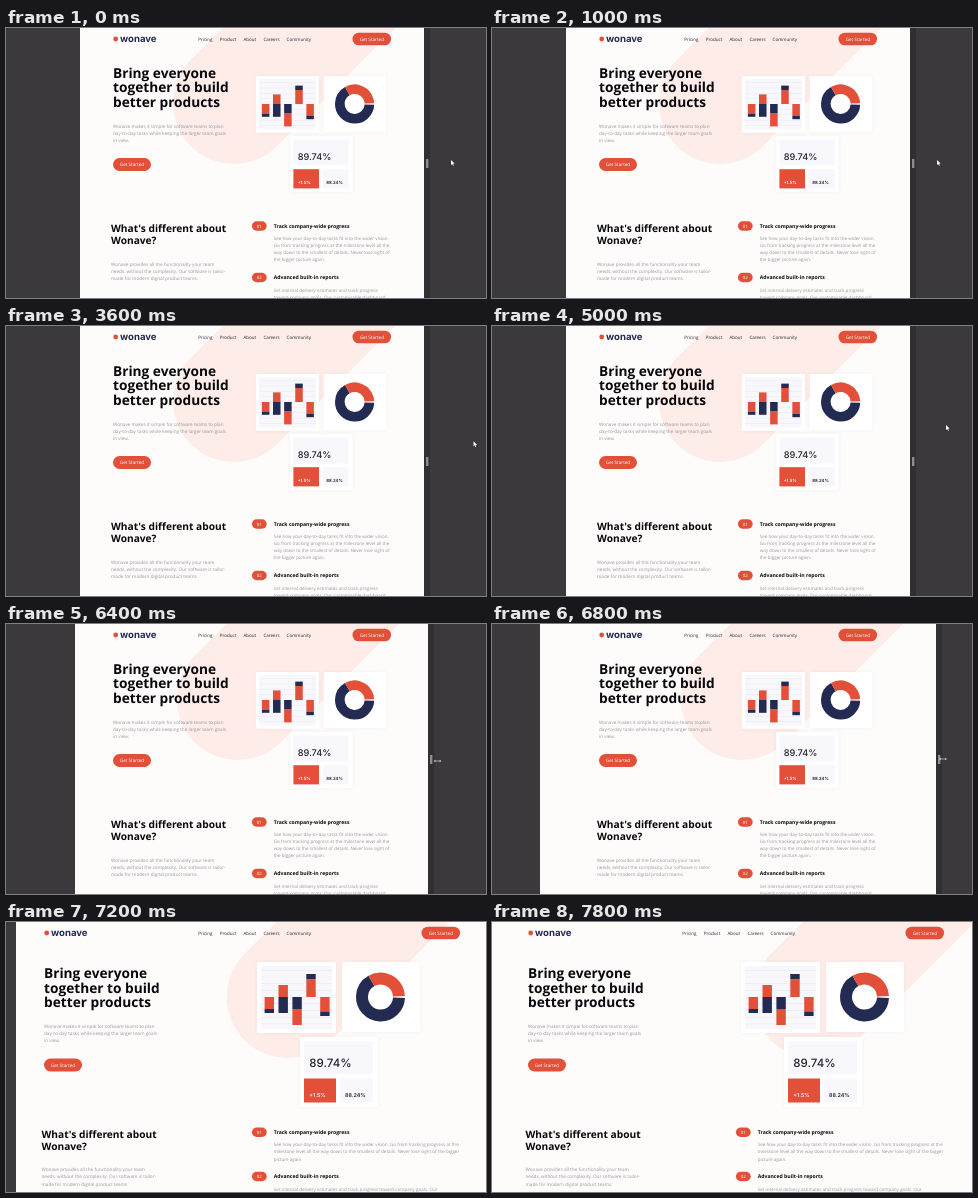
Animation of 480x270 px, one loop 8000 ms. Source, as an HTML page with a canvas:

```html
<!DOCTYPE html>
<html lang="en">
<head>
<meta charset="utf-8">
<title>Responsive landing page</title>
<style>
  html, body { margin: 0; width: 100%; height: 100%; overflow: hidden; background: #3b393c; }
  canvas { display: block; width: 480px; height: 270px; }
</style>
</head>
<body>
<canvas id="stage"></canvas>
<script>
const LOOP = 8000, STEP = 200;
const RED = '#e3503a', NAVY = '#242b52', INK = '#08080c', GREY = '#96969e', PANEL = '#f8f8fc';
const SANS = '"Open Sans", "Noto Sans", sans-serif';
const canvas = document.getElementById('stage');
const ctx = canvas.getContext('2d');
const ratio = window.devicePixelRatio || 1;
canvas.width = 480 * ratio;
canvas.height = 270 * ratio;

const layouts = {
  narrow: {
    left: 107, right: 385, logoY: 11, heroY: 49.5, introY: 99.6, ctaY: 136.5,
    titleX: 105, titleY: 203.8, aboutY: 237.5,
    art: [0.8, 49, 16],
    features: [
      [198, 'Track company-wide progress', 212, [
        'See how your day-to-day tasks fit into the wider vision.',
        'Go from tracking progress at the milestone level all the',
        'way down to the smallest of details. Never lose sight of',
        'the bigger picture again.']],
      [249.5, 'Advanced built-in reports', 263.5, [
        'Set internal delivery estimates and track progress',
        'toward company goals. Our customisable dashboard']]
    ]
  },
  wide: {
    left: 38, right: 454, logoY: 11, heroY: 56, introY: 105.8, ctaY: 143,
    titleX: 35.5, titleY: 215.8, aboutY: 249.2,
    art: [1, 0, 0],
    features: [
      [210.2, 'Track company-wide progress', 224.3, [
        'See how your day-to-day tasks fit into the wider vision. Go from tracking progress at the',
        'milestone level all the way down to the smallest of details. Never lose sight of the bigger',
        'picture again.']],
      [254.5, 'Advanced built-in reports', 268.5, [
        'Set internal delivery estimates and track progress toward company goals. Our']]
    ]
  }
};

// Linear interpolation over [time, value] pairs
function track(t, keys) {
  if (t <= keys[0][0]) return keys[0][1];
  for (let i = 1; i < keys.length; i++) {
    const [t0, a] = keys[i - 1], [t1, b] = keys[i];
    if (t <= t1) return a + (b - a) * (t - t0) / (t1 - t0);
  }
  return keys[keys.length - 1][1];
}

function rect(x, y, w, h, color) {
  ctx.fillStyle = color;
  ctx.fillRect(x, y, w, h);
}

function text(str, x, y, size, color, weight = 400, align = 'left', family = SANS) {
  ctx.font = `${weight} ${size}px ${family}`;
  ctx.textAlign = align;
  ctx.fillStyle = color;
  ctx.fillText(str, x, y);
}

function lines(list, x, y, pitch, ...style) {
  list.forEach((str, i) => text(str, x, y + i * pitch, ...style));
}

function pill(cx, cy, w, h, label, size) {
  ctx.fillStyle = RED;
  ctx.beginPath();
  ctx.roundRect(cx - w / 2, cy - h / 2, w, h, h / 2);
  ctx.fill();
  text(label, cx, cy + size * 0.36, size, '#fff', 400, 'center');
}

function card(x, y, w, h) {
  ctx.save();
  ctx.shadowColor = 'rgba(60, 50, 80, 0.05)';
  ctx.shadowBlur = 4 * ratio;
  rect(x, y, w, h, '#fff');
  ctx.restore();
}

function drawBlob(x) {
  const y = 75, r = 61;
  ctx.strokeStyle = '#fdece8';
  ctx.lineWidth = 2 * r;
  ctx.lineCap = 'round';
  ctx.beginPath();
  ctx.moveTo(x, y);
  ctx.lineTo(x + 300, y - 300);
  ctx.stroke();
}

function arc(from, to, color) {
  ctx.strokeStyle = color;
  ctx.lineWidth = 12;
  ctx.lineCap = 'butt';
  ctx.beginPath();
  ctx.arc(374.5, 75, 18.5, from, to);
  ctx.stroke();
}

function drawCharts([scale, dx, dy]) {
  ctx.save();
  ctx.translate(dx, dy);
  ctx.scale(scale, scale);

  card(251, 40, 79, 71);
  rect(255, 44, 71, 63, PANEL);
  for (let y = 48; y < 107; y += 6.7) rect(255, y, 71, 0.6, '#e6e7f0');
  const bars = [
    [75, 87, 91, RED, NAVY], [63, 75, 91, RED, NAVY], [75, 87, 103, NAVY, RED],
    [52, 57.5, 75, NAVY, RED], [75, 89.5, 94, RED, NAVY]
  ];
  bars.forEach(([top, split, bottom, upper, lower], i) => {
    const x = 258.6 + i * 13.9;
    rect(x, top, 9.4, split - top, upper);
    rect(x, split, 9.4, bottom - split, lower);
  });

  card(336, 40, 78, 70);
  arc(0.04, 4.2, NAVY);
  arc(4.2, 6.24, RED);

  card(294, 115, 78, 70);
  rect(298, 119.5, 69, 32.5, PANEL);
  rect(298, 156.5, 32, 24, RED);
  rect(334, 156.5, 33, 24, PANEL);
  const inter = 'Inter, sans-serif';
  text('89.74%', 303.3, 145, 11.5, '#20222e', 500, 'left', inter);
  text('+1.5%', 303.3, 175, 5.4, '#fff', 600, 'left', inter);
  text('88.24%', 339, 175, 5.4, '#20222e', 600, 'left', inter);
  ctx.restore();
}

function drawPage(page) {
  const x = page.left;
  ctx.fillStyle = RED;
  ctx.beginPath();
  ctx.arc(x + 2.7, page.logoY, 2.4, 0, 2 * Math.PI);
  ctx.fill();
  text('wonave', x + 7, 14, 9.6, NAVY, 700, 'left', 'Inter, sans-serif');

  const nav = { Pricing: 192.3, Product: 213.8, About: 237.5, Careers: 257.5, Community: 280.6 };
  for (const label in nav) text(label, nav[label], 12.9, 4.5, '#26262e', 500);
  pill(page.right - 19.2, 11, 38.6, 12.6, 'Get Started', 4.6);

  lines(['Bring everyone', 'together to build', 'better products'], x, page.heroY, 14.6, 13.7, INK, 700);
  lines(['Wonave makes it simple for software teams to plan',
    'day-to-day tasks while keeping the larger team goals',
    'in view.'], x, page.introY, 7.2, 4.65, GREY);
  pill(x + 19, page.ctaY, 38, 13, 'Get Started', 4.6);

  drawCharts(page.art);

  lines(["What's different about", 'Wonave?'], page.titleX, page.titleY, 11.9, 10.2, INK, 700);
  lines(['Wonave provides all the functionality your team',
    'needs, without the complexity. Our software is tailor-',
    'made for modern digital product teams.'], page.titleX, page.aboutY, 7.2, 4.68, GREY);

  page.features.forEach(([y, title, bodyY, body], i) => {
    pill(253.3, y, 14.8, 9.4, '0' + (i + 1), 4.4);
    text(title, 267.7, y + 1.8, 5.13, INK, 700);
    lines(body, 267.7, bodyY, 7.1, 4.55, GREY);
  });
}

function drawArrow(x, y) {
  ctx.beginPath();
  [[0, 0], [0, 5], [1.2, 4], [2, 5.8], [2.8, 5.4], [2, 3.7], [3.6, 3.6]]
    .forEach(([px, py]) => ctx.lineTo(x + px, y + py));
  ctx.closePath();
  ctx.fillStyle = '#fff';
  ctx.fill();
}

function drawResizeCursor(x, y) {
  const color = '#dcdcde';
  rect(x - 2.5, y - 0.3, 5, 0.6, color);
  for (const side of [-1, 1]) {
    ctx.beginPath();
    ctx.moveTo(x + side * 3.8, y);
    ctx.lineTo(x + side * 2.2, y - 1.3);
    ctx.lineTo(x + side * 2.2, y + 1.3);
    ctx.fill();
  }
}

function draw(t) {
  const grow = track(t, [[6200, 0], [6400, 4.5], [6600, 14], [6800, 26], [7000, 45],
    [7200, 64], [7400, 88], [7600, 105], [7800, 112]]);
  const left = Math.floor(74 - grow), right = Math.floor(418 + grow);
  const wide = right - left >= 430;
  const shift = t >= 7600 ? -2 : 0;

  ctx.setTransform(ratio, 0, 0, ratio, 0, 0);
  ctx.textRendering = 'geometricPrecision';
  rect(0, 0, 480, 270, '#3b393c');
  rect(right, 0, 6, 270, '#302f32');
  rect(left, 0, right - left, 270, '#fefcfb');

  ctx.save();
  ctx.beginPath();
  ctx.rect(left, 0, right - left, 270);
  ctx.clip();
  drawBlob(228 + grow * 0.84);
  ctx.translate(shift, 0);
  drawPage(wide ? layouts.wide : layouts.narrow);
  ctx.restore();

  rect(right + 2, 131, 2.4, 9, '#8d8c90');
  if (t < 5600) {
    drawArrow(
      track(t, [[2600, 445], [3800, 472], [4000, 472], [5000, 454], [5200, 448], [5600, 422]]),
      track(t, [[2600, 132], [3800, 112], [5000, 99], [5200, 108], [5600, 134]]));
  } else {
    drawResizeCursor(right + track(t, [[6200, 6], [6400, 9.5], [6800, 7]]),
      track(t, [[6400, 137], [6800, 135]]));
  }
}

function frame(now) {
  draw(Math.floor(now % LOOP / STEP) * STEP);
  requestAnimationFrame(frame);
}
requestAnimationFrame(frame);
</script>
</body>
</html>
```
